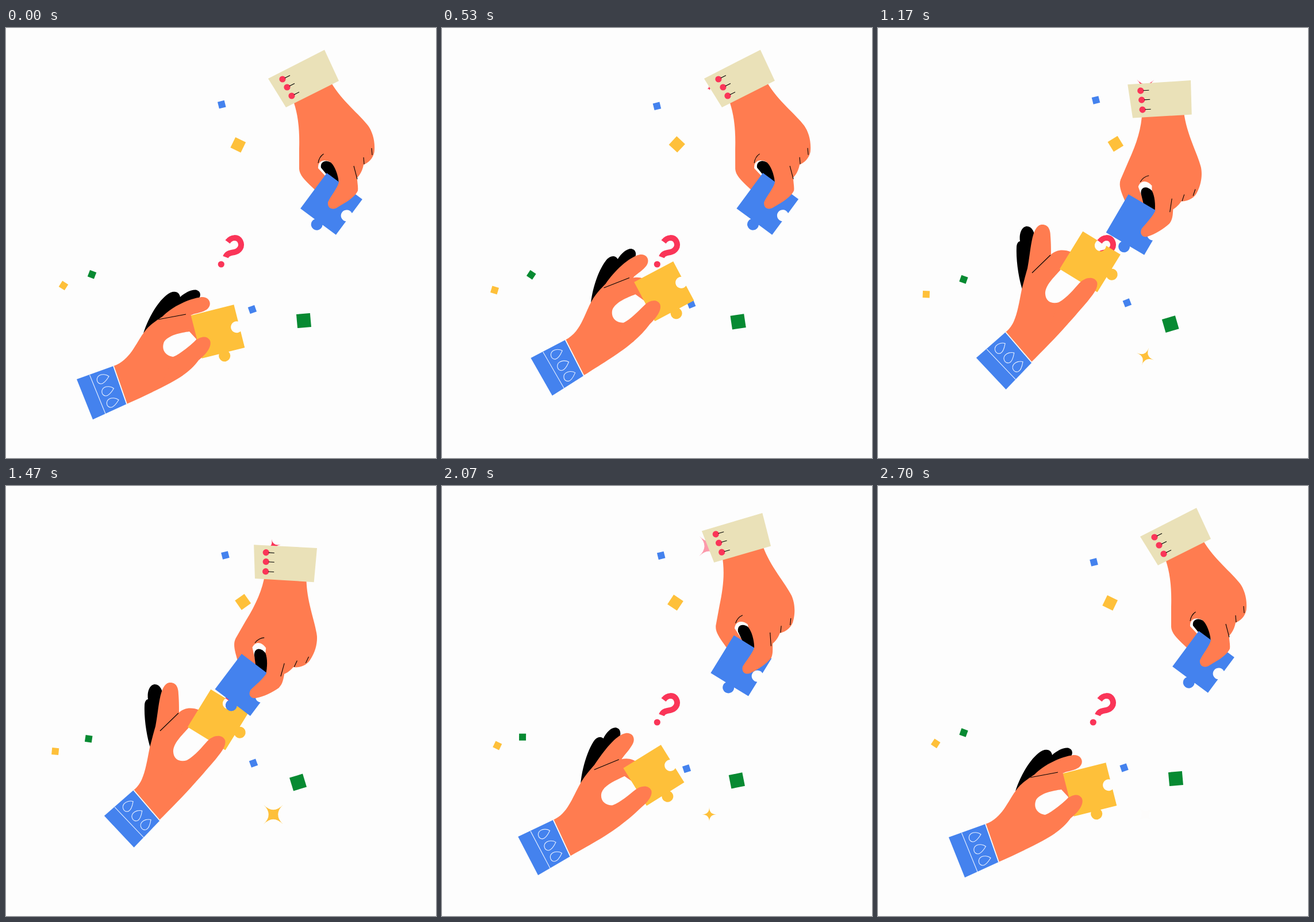
An HTML page that plays this animation: 748x748 px, repeating every 2730 ms.

```html
<!DOCTYPE html>
<html lang="en">
<head>
<meta charset="utf-8">
<title>Puzzle hands</title>
<style>
  html, body { margin: 0; width: 100%; height: 100%; overflow: hidden; background: #fdfdfd; }
  svg { display: block; width: 100%; height: 100%; }
  .skin { fill: #ff7c50; }
  .paper { fill: #fdfdfd; }
  .blue { fill: #4482ee; }
  .yellow { fill: #fec03a; }
  .green { fill: #078a32; }
  .red { fill: #fa3558; }
  .cream { fill: #eae1b8; }
  .ink { fill: none; stroke: #000; stroke-width: 1.1; }
  .stitch { fill: none; stroke: #e9f1ff; stroke-width: 1.1; }
</style>
</head>
<body>
<svg viewBox="0 0 748 748">
  <defs>
    <path id="piece" d="M-38.5-38.5H38.5V-8.2A10 10 0 1 0 38.5 9.2V38.5H9.5A10 10 0 1 1-7.5 38.5H-38.5Z"/>
    <path id="star" d="M0-1Q-.02.02 1 0Q-.02-.02 0 1Q.02-.02-1 0Q.02.02 0-1Z"/>
    <path id="drop" class="stitch" d="M11-5C6-9-1-9-5-7C-12-3-11 7-3 8C3 8 8 0 11-5Z"/>
    <g id="button"><circle class="red" r="5.6"/><path class="ink" d="M4-2L13-6.5"/></g>
  </defs>

  <g id="confetti"></g>
  <use id="starYellow" href="#star" class="yellow"/>
  <use id="starRed" href="#star" class="red"/>

  <path d="M385.5 372C392 363 403 363 407.500 371C412 380 406 388 397 390C388 391.5 384 393 382 398.5" fill="none" stroke="#fa3558" stroke-width="10"/>
  <circle class="red" cx="374.3" cy="411" r="5.6"/>

  <g id="left">
    <path id="leftBack"/>
    <path id="leftBody" class="skin"/>
    <path id="leftHole" class="paper"/>
    <use id="leftPiece" href="#piece" class="yellow"/>
    <path id="leftThumb" class="skin"/>
    <path id="leftCrease" class="ink"/>
    <path class="blue" d="M123 611L187 588L210 654L151 681Z"/>
    <path d="M187 588L210 654" stroke="#fdfdfd" stroke-width="1.8"/>
    <path class="stitch" d="M145.5 603.5L173 671"/>
    <use href="#drop" x="168" y="611"/>
    <use href="#drop" x="176.500" y="632"/>
    <use href="#drop" x="185" y="652"/>
  </g>

  <g id="right">
    <path class="skin" d="M498 122C508 148 511 175 510 210L510 245C511 257 520 265 538 282L575 290L609 262C616 256 620 248 622 238C634 233 641 222 641 212C642 195 637 180 630 170C615 150 585 128 565 94Z"/>
    <path class="paper" d="M543 244C542 232 552 227 564 233L580 268L556 258Z"/>
    <path id="rightBack"/>
    <use id="rightPiece" href="#piece" class="blue"/>
    <path id="rightFinger" class="skin"/>
    <path class="ink" d="M636 209L637 221M622 225L623 237M605 240L611 263M543 235C544 227 548 222 552.5 219"/>
    <path class="cream" d="M456 88L554 38L579 92L487 138Z"/>
    <use href="#button" x="481" y="89"/>
    <use href="#button" x="489" y="103"/>
    <use href="#button" x="497" y="118"/>
  </g>
</svg>
<script>
const LOOP = 2730, SETTLED = 2700, TAU = 2 * Math.PI;
const byId = id => document.getElementById(id);
const place = (el, x, y, angle, scale = 1) =>
  el.setAttribute('transform', `translate(${x} ${y}) rotate(${angle}) scale(${scale})`);

// Sine ease from 0 to 1 between two times.
function ease(t, start, end) {
  const u = Math.min(1, Math.max(0, (t - start) / (end - start)));
  return (1 - Math.cos(Math.PI * u)) / 2;
}

// Wind up, reach out, hold, swing back past rest and settle. Each channel
// follows the same clock with its own lag and overshoot each way.
function swing(clock, rest, reach, out, back) {
  return t => {
    const a = t - out.lag, b = t - back.lag;
    const progress = (1 + out.dip) * ease(a, clock.launch, clock.arrive)
      - out.dip * ease(a, clock.windup, clock.launch)
      - (1 + back.dip) * ease(b, clock.leave, clock.recoil)
      + back.dip * ease(t, clock.recoil + back.lag, SETTLED);
    return rest + (reach - rest) * progress;
  };
}

// Blends a path from its closed to its open drawing by turning each point
// around the knuckle.
function morph(id, hand, closed, open) {
  const polar = (x, y) => [Math.hypot(x, y), Math.atan2(y, x)];
  const points = d => d.match(/[\d.]+ [\d.]+/g).map(p => p.split(' ').map(Number));
  const [ax, ay] = hand.anchor, [kx, ky] = hand.knuckle, [ox, oy, angle] = hand.openPose;
  const from = points(closed).map(([x, y]) => polar(x - kx, y - ky));
  const to = points(open).map(([x, y]) => {
    const [r, a] = polar(x - ox, y - oy), local = a - angle * TAU / 360;
    return polar(ax + r * Math.cos(local) - kx, ay + r * Math.sin(local) - ky);
  });
  const el = byId(id);
  return k => {
    let i = 0;
    el.setAttribute('d', closed.replace(/[\d.]+ [\d.]+/g, () => {
      const [r0, a0] = from[i], [r1, a1] = to[i++];
      const turn = Math.atan2(Math.sin(a1 - a0), Math.cos(a1 - a0));
      const r = r0 + (r1 - r0) * k, a = a0 + turn * k;
      return `${(kx + r * Math.cos(a)).toFixed(2)} ${(ky + r * Math.sin(a)).toFixed(2)}`;
    }));
  };
}

function animateHand(hand) {
  const group = byId(hand.name), piece = byId(hand.name + 'Piece');
  const parts = hand.shapes.map(([id, closed, open]) => morph(id, hand, closed, open));
  const [ax, ay] = hand.anchor, grip = hand.grip;
  return t => {
    const open = hand.open(t);
    group.setAttribute('transform',
      `translate(${hand.x(t)} ${hand.y(t)}) rotate(${hand.angle(t)}) translate(${-ax} ${-ay})`);
    place(piece, grip.x, grip.y, grip.angle + grip.twist * open);
    parts.forEach(part => part(open));
  };
}

// A square that drifts around an ellipse once per loop; phases in degrees.
function confetto(color, size, [x, y, angle], [dx, dy, spin], phaseX, phaseY = phaseX) {
  const el = document.createElementNS('http://www.w3.org/2000/svg', 'rect');
  const box = { class: color, x: -size / 2, y: -size / 2, width: size, height: size };
  for (const key in box) el.setAttribute(key, box[key]);
  byId('confetti').append(el);
  const wave = (t, phase) => Math.cos(TAU * (t / LOOP - phase / 360));
  return t => {
    const w = wave(t, phaseX);
    place(el, x + dx * w, y + dy * wave(t, phaseY), angle + spin * w);
  };
}

function twinkle(id, x, y, s) {
  const el = byId(id);
  return t => {
    const pulse = s.size + 6 * Math.cos(TAU * (t - s.peak) / s.period);
    place(el, x, y, (t - s.upright) * s.spin, pulse * ease(t, ...s.grow));
    el.setAttribute('opacity', 1 - ease(t, ...s.fade));
  };
}

const leftClock = { windup: 0, launch: 250, arrive: 650, leave: 1690, recoil: 2240 };
const rightClock = { windup: 500, launch: 900, arrive: 1280, leave: 1737, recoil: 2257 };

const left = {
  name: 'left',
  anchor: [187, 588], knuckle: [285, 512], openPose: [222, 529, -21.5],
  grip: { x: 368.5, y: 528, angle: -14.2, twist: -22.7 },
  x: swing(leftClock, 187, 222, { lag: 0, dip: 0.03 }, { lag: 0, dip: 0.03 }),
  y: swing(leftClock, 588, 529, { lag: 0, dip: 0.12 }, { lag: 0, dip: 0.12 }),
  angle: swing(leftClock, 0, -21.5, { lag: 88, dip: 0.2 }, { lag: 66, dip: 0.2 }),
  open: swing(leftClock, 0, 1, { lag: 136, dip: 0.05 }, { lag: 130, dip: 0.1 }),
  shapes: [
    ['leftBack',
      'M239 531C246 508 262 478 280 464C290 456 301 457 303 468C312 460 324 454 332 456C340 459 339 468 334 472L290 492L262 510Z',
      'M252 458C245 438 240 405 241 382C241 374 245 371 247 371C245 358 250 345 259 345C268 345 272 355 273 364L268 400L262 425Z'],
    ['leftBody',
      'M187 588C216 578 226 548 239 531C249 516 262 509 272 502C290 484 318 471 340 468C356 467 360 484 347 491C338 496 328 496 321 500C330 500 340 505 345 510L335 545L300 575L308 604C290 617 250 636 210 654Z',
      'M222 529C240 515 243 490 250 455C254 440 257 428 260 418C266 390 266 345 284 342C297 341 300 352 300 362C301 375 301 385 301 394C310 386 322 384 337 390L345 440L320 478L330 515C310 538 285 563 267 581Z'],
    ['leftHole',
      'M319 528C304 530 283 534 275 546C270 558 276 570 291 572C305 569 318 555 331 542L331 541Z',
      'M318 420C306 434 290 448 291 463C292 476 303 481 315 477C330 470 345 452 360 440L340 425Z'],
    ['leftThumb',
      'M291 572C305 566 320 552 330 544C337 537 350 534 355 544C359 556 345 570 335 578C327 589 318 597 308 604L270 620Z',
      'M315 477C330 468 340 455 350 444C360 433 376 431 381 442C384 453 372 466 365 475C352 490 341 503 330 515L295 530Z'],
    ['leftCrease', 'M265 507L313 498', 'M268 426L300 395']
  ]
};

const right = {
  name: 'right',
  anchor: [487, 138], knuckle: [595, 245], openPose: [485, 137, -5.4],
  grip: { x: 566, y: 306, angle: 36.6, twist: -29.5 },
  x: swing(rightClock, 487, 433, { lag: 0, dip: -0.02 }, { lag: 0, dip: 0.04 }),
  y: swing(rightClock, 138, 161, { lag: 0, dip: 0.04 }, { lag: -130, dip: 0.25 }),
  angle: swing(rightClock, 0, 30, { lag: 0, dip: 0.19 }, { lag: 57, dip: 0.18 }),
  open: swing(rightClock, 0, 1, { lag: -350, dip: 0 }, { lag: 94, dip: 0.08 }),
  shapes: [
    ['rightBack',
      'M548 243C546 233 556 228 565 234C572 240 578 256 579 270L557 254Z',
      'M561 246C554 236 562 228 575 232C584 238 592 250 597 262L575 261Z'],
    ['rightFinger',
      'M579 240L579 268C577 278 565 292 560 303C559 313 566 317 575 313C588 305 606 296 612 283C613 274 610 266 611 255L605 240Z',
      'M594 240L597 262C597 275 593 288 591 299C592 310 602 312 608 304C616 296 625 280 629 268C631 258 626 250 623 243L612 225Z']
  ]
};

const scene = [
  animateHand(left),
  animateHand(right),
  confetto('blue', 12, [378, 127.5, -14], [4.3, -8.8, 0], 231),
  confetto('yellow', 20, [408.3, 202.5, 41.5], [5, -1, 17], 155),
  confetto('green', 12, [147.5, 434, 16.5], [7.8, 6, 17], 75, 210),
  confetto('yellow', 12, [92.3, 455.3, 18], [8.5, -8, 16], 335),
  confetto('blue', 12, [430, 485, -20], [4.7, -8, -2], 110, 125),
  confetto('green', 24, [513, 512.3, -11], [5, -3.3, 6], 5),
  twinkle('starYellow', 465, 571.5,
    { size: 18, peak: 1470, period: 1000, upright: 870, spin: 0.075, grow: [780, 1100], fade: [2450, 2720] }),
  twinkle('starRed', 465, 105,
    { size: 19, peak: 2070, period: 1100, upright: 710, spin: 0.1, grow: [430, 700], fade: [1900, 2240] })
];

const start = performance.now();
function frame() {
  const t = (performance.now() - start) % LOOP;
  scene.forEach(draw => draw(t));
  requestAnimationFrame(frame);
}
frame();
</script>
</body>
</html>
```
